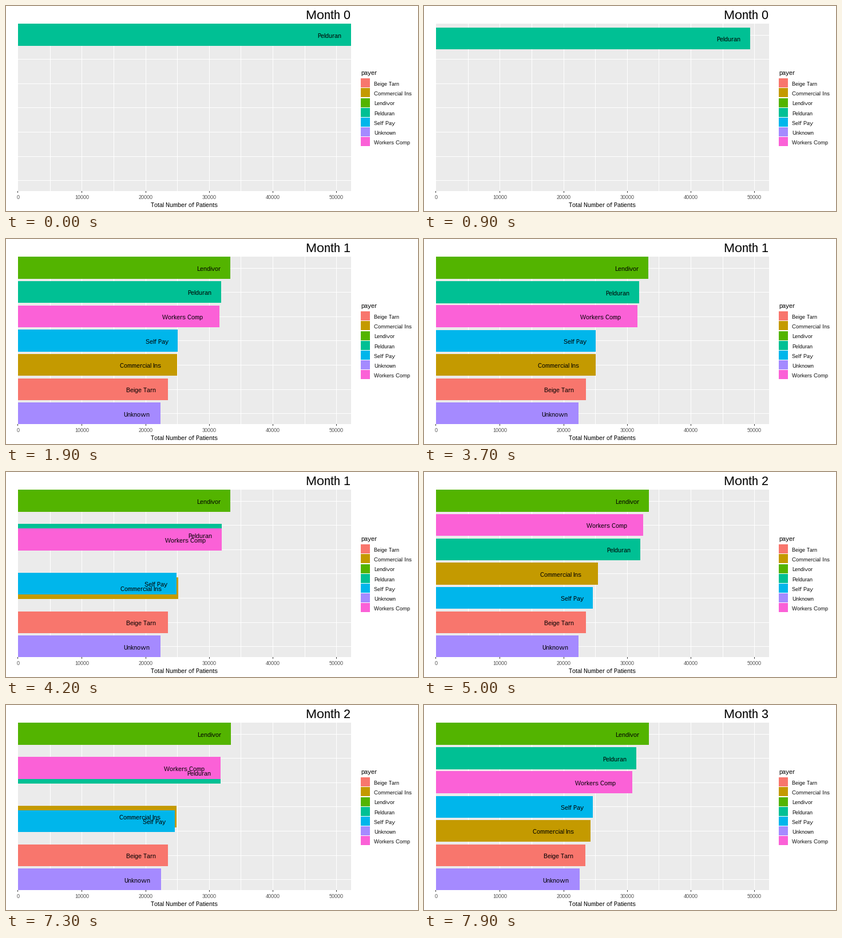
Recreate the animation shown at these times as a matplotlib script. Size 720 by 360 pixels, loop 8000 ms.

```python
import matplotlib.pyplot as plt
import numpy as np
from matplotlib.animation import FuncAnimation
from matplotlib.patches import Rectangle

plt.rcParams.update({
    "font.family": "Liberation Sans",
    "text.hinting": "native",
    "text.hinting_factor": 1,
    "text.kerning_factor": 6,
})

W, H, DPI = 720, 360, 72          # at 72 dpi one point is one pixel
LEFT, TOP, RIGHT, BOTTOM = 21, 31, 603, 325
X0, PX_PER_K = 20.9, 11.13        # thousands of patients to pixels
ROW0, ROW_STEP, HALF = 50.55, 42.65, 19.2
FPS, FRAMES = 10, 80
LEAD, MOVE, PERIOD = 4, 15, 31    # frames before, during and between moves
NONE = np.nan

# name, colour, thousands of patients for months 0 to 3
PAYERS = [
    ("Beige Tarn", "#F8766D", (NONE, 23.55, 23.55, 23.45)),
    ("Commercial Ins", "#C49A00", (NONE, 25.03, 25.40, 24.25)),
    ("Lendivor", "#53B400", (NONE, 33.30, 33.40, 33.40)),
    ("Pelduran", "#00C094", (52.33, 31.90, 32.10, 31.45)),
    ("Self Pay", "#00B6EB", (NONE, 25.07, 24.60, 24.60)),
    ("Unknown", "#A58AFF", (NONE, 22.35, 22.40, 22.55)),
    ("Workers Comp", "#FB61D7", (NONE, 31.60, 32.55, 30.80)),
]
values = np.array([p[2] for p in PAYERS]).T
# NaN sorts last, so missing payers never affect the ranks shown
ranks = np.argsort(np.argsort(-values, axis=1), axis=1)

fig = plt.figure(figsize=(W / DPI, H / DPI), dpi=DPI, facecolor="white")
ax = fig.add_axes([0, 0, 1, 1])
ax.set(xlim=(0, W), ylim=(H, 0))
ax.axis("off")


def box(x, y, w, h, color, z=0):
    return ax.add_patch(Rectangle((x, y), w, h, fc=color, lw=0,
                                  antialiased=False, zorder=z))


def label(x, y, text, size, ha="left", color="black"):
    return ax.text(x, y, text, size=size, ha=ha, va="baseline",
                   color=color, zorder=5)


def px(thousands):
    return X0 + PX_PER_K * thousands


def row_y(rank):
    return ROW0 + ROW_STEP * rank


def draw_panel():
    box(LEFT, TOP, RIGHT - LEFT, BOTTOM - TOP, "#EBEBEB")
    for k in range(5, 55, 5):
        box(round(px(k)), TOP, 1, BOTTOM - TOP, "white", 1)
    for r in range(len(PAYERS)):
        box(LEFT, round(row_y(r)), RIGHT - LEFT, 1, "white", 1)
    for k in range(0, 60, 10):
        x = round(px(k))
        box(x - (k == 0), BOTTOM, 1, 3, "#333333", 1)
        label(x + (0.5 if k else 0), 339, str(k * 1000), 9, "center", "#4D4D4D")
    label(311.5, 353, "Total Number of Patients", 10.6, "center")


def draw_legend():
    label(620, 121, "payer", 10.6)
    for i, (name, color, _) in enumerate(PAYERS):
        box(620, round(127 + 17.25 * i), 16, 16, color)
        label(643, round(140 + 17.2 * i), name, 9)


draw_panel()
draw_legend()
title = label(602, 23, "", 22, "right")
bars = [box(LEFT, 0, 0, 0, color, 2) for _, color, _ in PAYERS]
tags = [label(0, 0, name, 10.6, "right") for name, _, _ in PAYERS]
gaps = [0.4 * tag.get_window_extent().width for tag in tags]


def cubic_in_out(t):
    return 4 * t ** 3 if t < 0.5 else 1 - 4 * (1 - t) ** 3


def mix(a, b, e):
    return b if e == 1 else a + (b - a) * e


def draw(frame):
    month, step = divmod(frame - LEAD, PERIOD)
    t = min(step / MOVE, 1)
    e = cubic_in_out(t)
    a, b = max(month, 0), month + 1
    title.set_text(f"Month {month + (t > 0.5)}")
    for i, (bar, tag) in enumerate(zip(bars, tags)):
        value = mix(values[a, i], values[b, i], e)
        shown = not np.isnan(value)
        bar.set_visible(shown)
        tag.set_visible(shown)
        if not shown:
            continue
        end = px(value)
        y = row_y(mix(ranks[a, i], ranks[b, i], e))
        top, bottom = round(y - HALF), min(round(y + HALF), BOTTOM)
        bar.set_bounds(LEFT, top, min(round(end), RIGHT) - LEFT, bottom - top)
        tag.set_position((end - gaps[i], round(y + 5.3)))
    return [title, *bars, *tags]


anim = FuncAnimation(fig, draw, frames=FRAMES, interval=1000 / FPS,
                     repeat=True, repeat_delay=0, blit=False)
plt.show()
```
